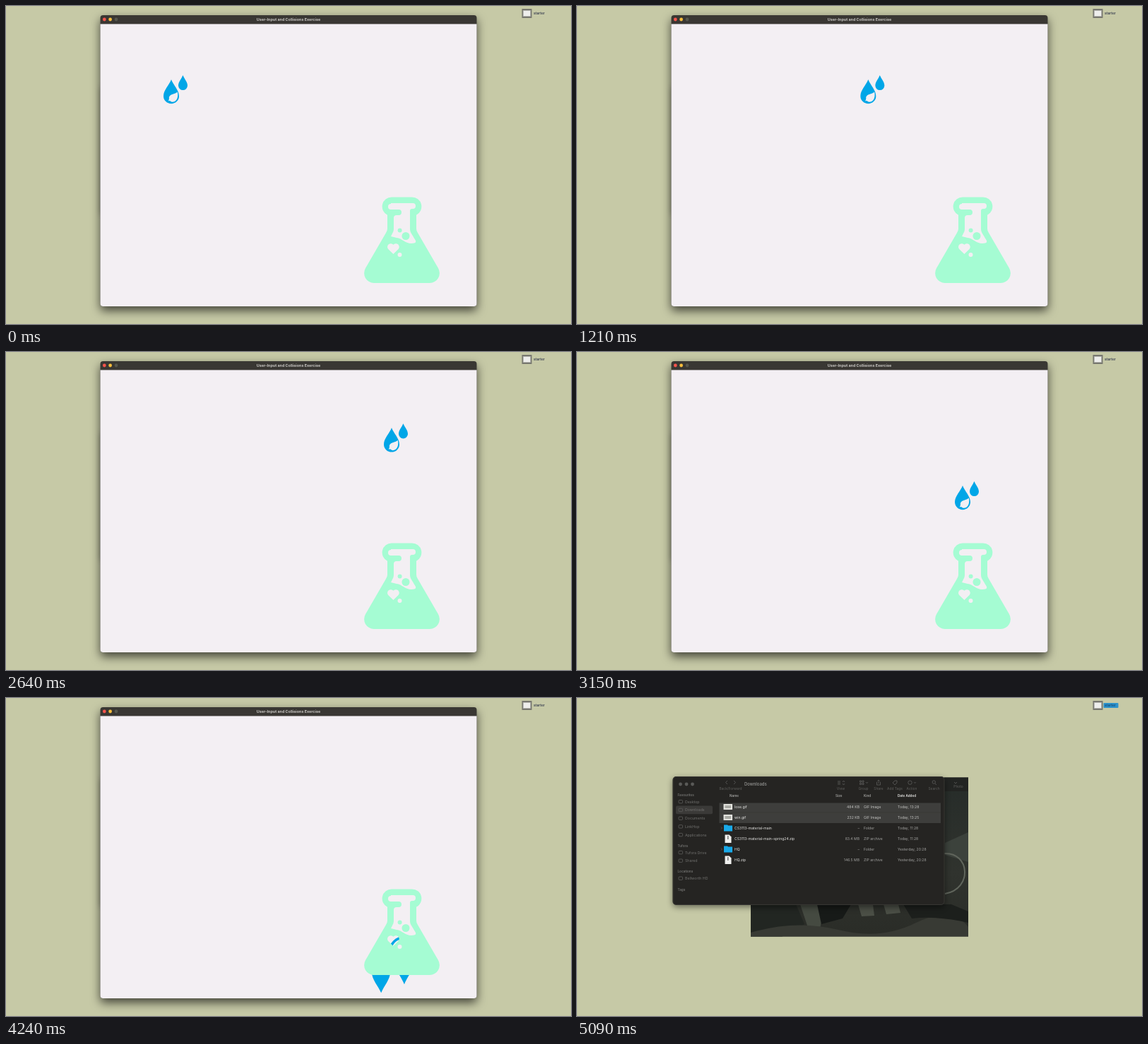
Recreate the animation shown at these times as an HTML page. Size 800x450 px, loop 5120 ms.

```html
<!DOCTYPE html>
<html lang="en">
<head>
<meta charset="utf-8">
<title>Collisions</title>
<style>
  html, body { margin: 0; width: 100%; height: 100%; overflow: hidden; background: #c6c9a6; }
  svg { display: block; width: 800px; height: 450px; font: 5.1px Inter, "Open Sans", sans-serif; }
  .side { font-size: 5.25px; fill: #70706e; }
  .head { font-size: 4.6px; font-weight: 600; }
  .tool { font-size: 4.9px; fill: #5e5e5c; text-anchor: middle; }
  .line { fill: none; stroke: #5e5e5c; stroke-width: .8; }
  .finder { filter: drop-shadow(0 3px 4px #0007); }
  .shade { filter: drop-shadow(0 6px 7px #000a); }
</style>
</head>
<body>
<svg viewBox="0 0 800 450">
  <defs>
    <clipPath id="view"><path d="M133.5 25.5H666.500V421q0 4-4 4H137.500q-4 0-4-4Z"/></clipPath>
    <clipPath id="photoBox"><rect x="246" y="112.500" width="308" height="225"/></clipPath>
    <linearGradient id="scene" x2="0" y2="1">
      <stop stop-color="#262c29"/><stop offset=".6" stop-color="#30332e"/><stop offset="1" stop-color="#2a2c27"/>
    </linearGradient>
  </defs>
  <rect width="800" height="450" fill="#c6c9a6"/>

  <!-- photo window -->
  <g clip-path="url(#photoBox)">
    <path fill="url(#scene)" d="M246 112H554V338H246Z"/>
    <path fill="#222422" d="M520 112H554V132H520Z"/>
    <path fill="#3c423c" d="M521 205L554 190V232L521 222Z"/>
    <path fill="#222622" d="M246 292H310L322 320L290 338H246Z"/>
    <path fill="#454a41" d="M316 292L352 292L344 326L326 322Z"/>
    <path fill="#171a18" d="M340 292H388L376 312L346 320Z"/>
    <path fill="#4b4f46" d="M398 292H419L421 308L403 309ZM434 292H455L458 304L438 306Z"/>
    <path fill="#383a34" d="M246 332Q310 313 370 328T480 318T554 324V338H246Z"/>
    <path fill="#1c1f1c" d="M462 292H530L554 302V318Q510 308 474 312Z"/>
    <path fill="none" stroke="#60655c" stroke-width="2" d="M520 220C556 218 561 270 521 277"/>
    <text class="tool" x="540" y="127">Photo</text>
    <path class="line" d="M534 119l2 2 2-2"/>
  </g>

  <!-- file browser -->
  <rect class="finder" x="135.500" y="111" width="385" height="182" rx="5" fill="#252422"/>
  <rect x="136" y="111.500" width="384" height="181" rx="4.500" fill="none" stroke="#44443f" stroke-width=".6"/>
  <rect x="140" y="152.500" width="52" height="11.800" rx="2" fill="#3b3a38"/>
  <path fill="#3e3e3c" d="M201.500 148.500H515V177H201.500Z"/>
  <path stroke="#30302e" stroke-width=".5" d="M201.500 162H515"/>
  <g fill="#5a5a58"><circle cx="146.500" cy="122" r="2.400"/><circle cx="155" cy="122" r="2.400"/><circle cx="163.500" cy="122" r="2.400"/></g>
  <path class="line" d="M213 117l-2.500 2.500 2.500 2.500M222 117l2.500 2.500-2.500 2.500M369 118h4m-4 2h4m-4 2h4M376 119l1.500-2 1.500 2m-3 2l1.500 2 1.500-2M400.500 117h2v2h-2zm3.500 0h2v2h-2zm-3.500 3.500h2v2h-2zm3.500 0h2v2h-2zM409 119l1.500 1.500 1.500-1.500M425 119h-.5v4h5v-4h-.5m-2 2v-5m-1.500 1.500l1.500-1.500 1.500 1.500M447 120l3-3h3v3l-3 3zM477 119l1.500 1.500 1.500-1.500M507 121l2 2"/>
  <g class="line"><circle cx="471.500" cy="119.700" r="2.700"/><circle cx="505.300" cy="119" r="2.200"/></g>
  <text x="237" y="124.200" font-size="5.900" font-weight="600" fill="#8b8b89">Downloads</text>
  <g id="files"></g>

  <!-- desktop icon -->
  <path fill="#77776f" d="M730.500 4H744.500V17H730.500Z"/>
  <path fill="#eeeeec" stroke="#b9b9b4" d="M732.500 6.500H742.500V14.500H732.500Z"/>
  <rect id="mark" x="745.500" y="7" width="21" height="7" rx="1" fill="#2c92cc"/>
  <text id="label" x="747" y="12.200" font-size="4.900" font-weight="600">starter</text>

  <!-- game window -->
  <g id="game">
    <rect class="shade" x="133.500" y="13" width="533" height="412" rx="4" fill="#393733"/>
    <path fill="#f3eff3" d="M133.500 25.500H666.500V421q0 4-4 4H137.500q-4 0-4-4Z"/>
    <circle cx="139.300" cy="19" r="2.400" fill="#f4544d"/>
    <circle cx="147.600" cy="19" r="2.400" fill="#f5bd3c"/>
    <circle cx="156" cy="19" r="2.400" fill="#56574e"/>
    <text x="400" y="20.900" text-anchor="middle" font-size="5.400" font-weight="700" fill="#c9c7c3">User-Input and Collisions Exercise</text>
    <g clip-path="url(#view)">
      <g id="drops" fill="#00a6e7" fill-rule="evenodd">
        <path d="M234 104C231 112 223 119 223 127.400A11 10.800 0 0 0 245 127.400C245 119 237 112 234 104ZM242.800 121.500C239 125.500 230 124 231 131.500L229.800 134.500L232 134C236 138.500 245.500 134.500 242.800 121.500Z"/>
        <path d="M250.400 98C248.500 103 244 107.500 244 112.600A6.500 6.500 0 0 0 257 112.600C257 107.500 252.500 103 250.400 98Z"/>
      </g>
      <g fill="#a5fcd3">
        <path fill-rule="evenodd" d="M546 270.500H575A13.300 13.300 0 0 1 581 295.700V315Q581 318 583 321L612 371A14 14 0 0 1 600 392H521A14 14 0 0 1 509 371L538 321Q540 318 540 315V295.700A13.300 13.300 0 0 1 546 270.500Z
          M545 279H576a4 4 0 0 1 0 8H575q-3 0-3 3V316Q572 319 574 322L580 332Q581 335 578 335.500C566 338 562 329 553 328Q549 327 545 326L547 322Q549 318.500 549 316V300q0-4 4-4H556a4 4 0 0 0 0-8H545a4 4 0 0 1 0-8Z
          M548.400 351L541.200 344A4.700 4.700 0 0 1 548.400 337.800A4.700 4.700 0 0 1 555.600 344Z
          M554.500 352a3 3 0 0 0 6 0a3 3 0 0 0-6 0Z"/>
        <circle cx="557.600" cy="317.500" r="3"/>
        <circle cx="566" cy="325.500" r="5.500"/>
      </g>
    </g>
  </g>
</svg>
<script>
const $ = id => document.getElementById(id);
const LOOP = 5120, CLOSE = 4950;
const FALL_START = 2620, SPEED = 0.16, HIT = 3284;
const slide = [[90, 0], [820, 115], [1610, 243], [2050, 312]];

const text = (x, y, s, attrs) => `<text x="${x}" y="${y}" ${attrs}>${s}</text>`;

function buildFiles() {
  const sidebar = [
    ["Desktop", 146.7], ["Downloads", 158.5], ["Documents", 170.2], ["LinkHop", 181.9],
    ["Applications", 193.6], ["Tufora Drive", 218.6], ["Shared", 230.2], ["Bellworth HD", 255.2]
  ];
  const sections = [["Favourites", 137.5], ["Tufora", 209.2], ["Locations", 245.7], ["Tags", 270.9]];
  const tools = [["Back/Forward", 217.5], ["View", 373.5], ["Group", 405.5], ["Share", 427],
    ["Add Tags", 450], ["Action", 474], ["Search", 505.5]];
  const columns = [["Name", 216], ["Size", 366], ["Kind", 406], ["Date Added", 454]];
  const rows = [
    ["lose.gif", "484 KB", "GIF Image", "Today, 13:28"],
    ["win.gif", "232 KB", "GIF Image", "Today, 13:25"],
    ["CS3113-material-main", "–", "Folder", "Today, 11:28"],
    ["CS3113-material-main-spring24.zip", "83.4 MB", "ZIP archive", "Today, 11:28"],
    ["HQ", "–", "Folder", "Yesterday, 20:28"],
    ["HQ.zip", "146.5 MB", "ZIP archive", "Yesterday, 20:28"]
  ];
  const icons = {
    "GIF Image": y => `<path fill="#e4e4df" d="M207.500 ${y - 4}h12.500v8h-12.500z"/><path fill="#a9aaa4" d="M209.500 ${y - 2}h8.500v4h-8.500z"/>`,
    "Folder": y => `<path fill="#19a9e8" d="M208 ${y - 4.5}h5l1 1h6v8h-12z"/><path class="line" d="M204 ${y - 1.5}l1.500 1.500-1.500 1.500"/>`,
    "ZIP archive": y => `<path fill="#f0f0ee" d="M209.500 ${y - 5.5}h6l3 3v8.500h-9z"/><path fill="#777" d="M213 ${y - 4}h1.500v5h-1.500z"/>`
  };
  let out = "";
  for (const [s, y] of sidebar)
    out += `<rect class="line" x="144" y="${y - 2.2}" width="5.500" height="4.400" rx="1"/>` + text(153, y + 1.9, s, 'class="side"');
  for (const [s, y] of sections) out += text(142.500, y + 1.7, s, 'class="side head"');
  for (const [s, x] of tools) out += text(x, 130.2, s, 'class="tool"');
  for (const [s, x] of columns)
    out += text(x, 140.2, s, `class="head" fill="${s == "Date Added" ? "#e8e8e6" : "#a0a09e"}"`);
  rows.forEach(([name, size, kind, date], i) => {
    const y = 154 + 15 * i, base = y + 1.8, dim = i < 2 ? "#c4c4c2" : "#a3a3a1";
    out += icons[kind](y) + text(223, base, name, 'fill="#e6e6e4"')
      + text(400, base, size, `text-anchor="end" fill="${dim}"`)
      + text(406, base, kind, `fill="${dim}"`) + text(454, base, date, `fill="${dim}"`);
  });
  $("files").innerHTML = out;
}

function along(points, t) {
  if (t <= points[0][0]) return points[0][1];
  for (let i = 1; i < points.length; i++) {
    const [t0, a] = points[i - 1], [t1, b] = points[i];
    if (t < t1) return a + (b - a) * (t - t0) / (t1 - t0);
  }
  return points.at(-1)[1];
}

function draw(now) {
  const t = now % LOOP, open = t < CLOSE;
  const dx = along(slide, t), dy = Math.max(0, t - FALL_START) * SPEED;
  // touching the flask doubles the drops and turns them upside down
  const scale = t < HIT ? 1 : -2;
  $("drops").setAttribute("transform", `translate(${240 + dx} ${118 + dy}) scale(${scale}) translate(-240 -118)`);
  $("game").style.display = open ? "" : "none";
  $("mark").style.display = open ? "none" : "";
  $("label").setAttribute("fill", open ? "#3d4353" : "#174f7c");
  requestAnimationFrame(() => draw(performance.now()));
}

buildFiles();
draw(0);
</script>
</body>
</html>
```
